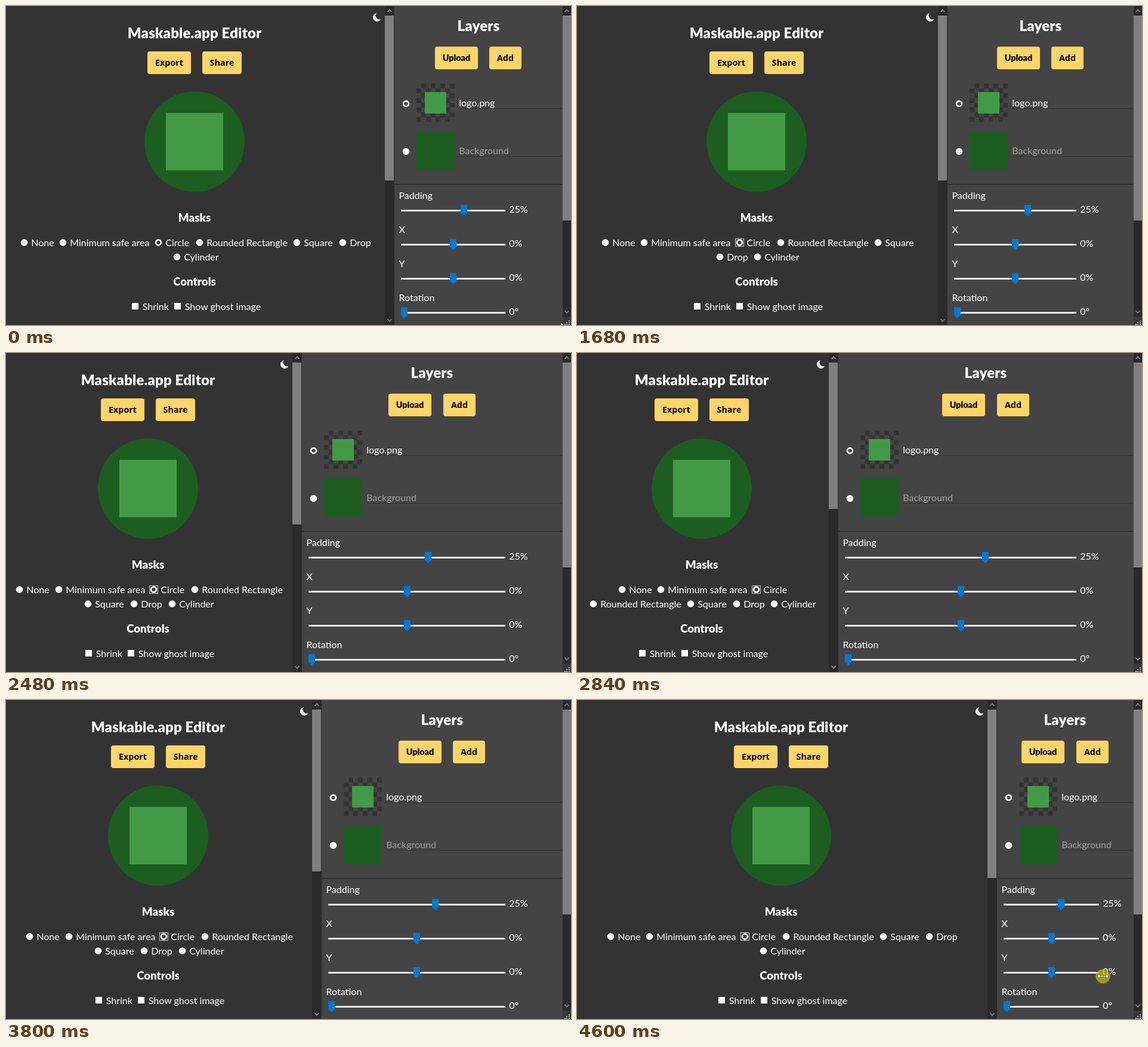
An HTML page that plays this animation: 947 px wide and 534 px high, repeating every 4840 ms.

```html
<!DOCTYPE html>
<html lang="en">
<head>
<meta charset="utf-8">
<title>Editor resize</title>
<style>
  html, body { margin: 0; width: 100%; height: 100%; overflow: hidden; background: #333; }
  svg { display: block; width: 947px; height: 534px; }
  text { font: 16px Lato, sans-serif; fill: #fff; white-space: pre; }
  .h1 { font-size: 24px; font-weight: 900; letter-spacing: .15px; text-anchor: middle; }
  .h3 { font-size: 18.72px; font-weight: 900; text-anchor: middle; }
  .btn { font: 700 14.4px "Open Sans", sans-serif; fill: #000; text-anchor: middle; }
  .lab { font: 900 14.4px Lato, sans-serif; fill: #000; text-anchor: middle; }
</style>
</head>
<body>
<svg id="stage" viewBox="0 0 947 534"></svg>
<script>
const LOOP = 4840, STEP = 40;
const stage = document.getElementById('stage');

// [time, x of the divider]
const DIVIDER = [
  [0, 651], [680, 651], [880, 645], [1040, 645], [1600, 627], [1640, 627],
  [1680, 621], [1920, 601], [2120, 572], [2200, 545], [2320, 521], [2560, 483],
  [2760, 451], [2840, 438], [3040, 424], [3280, 424], [3560, 458], [3720, 500],
  [3800, 529], [3840, 561], [3880, 568], [4080, 612], [4400, 678], [4600, 704], [LOOP, 704]
];
const CURSOR = [[0, 930, 529], [40, 930, 525], [160, 939, 525]];

// label, space it takes in a row
const MASKS = [
  ['None', 65.5], ['Minimum safe area', 159.5], ['Circle', 69],
  ['Rounded Rectangle', 163], ['Square', 77], ['Drop', 63.5], ['Cylinder', 86]
];
const SLIDERS = [['Padding', '25%', .61], ['X', '0%', .5], ['Y', '0%', .5], ['Rotation', '0°', 0]];

function add(parent, tag, attrs, text) {
  const el = document.createElementNS('http://www.w3.org/2000/svg', tag);
  for (const k in attrs) el.setAttribute(k, attrs[k]);
  if (text) el.textContent = text;
  return parent.appendChild(el);
}
const group = parent => add(parent, 'g', {});
const rect = (g, x, y, width, height, fill, rx = 0) => add(g, 'rect', { x, y, width, height, fill, rx });
const label = (g, x, y, text, cls = '') => add(g, 'text', { x, y, class: cls }, text);
const path = (g, d, fill) => add(g, 'path', { d, fill });
const move = (el, x, y = 0) => el.setAttribute('transform', `translate(${x} ${y})`);
const snap = x => Math.floor(x) + .5;

function radio(g, x, y, on, hole) {
  add(g, 'circle', { cx: x, cy: y, r: 5.8, fill: '#fff' });
  if (on) add(g, 'circle', { cx: x, cy: y, r: 3, fill: hole });
}
function button(g, x, y, w, text, cls) {
  rect(g, x, y, w, 38, '#ffd567', 4);
  label(g, x + w / 2, y + 24, text, cls);
}
function scrollbar(g, w, h, thumb) {
  rect(g, 0, 0, w, h, '#2a2a2a');
  for (const [y, s] of [[8, 1], [h - 8, -1]])
    add(g, 'path', {
      d: `M${w / 2 - 3.5} ${y + 2 * s}l3.5 ${-4 * s}l3.5 ${4 * s}`,
      fill: 'none', stroke: '#8c8c8c', 'stroke-width': 1.3
    });
  return rect(g, 0, 16, Math.min(w, 15), thumb - 16, '#808080');
}

// Preview side, centred on x = 0
const main = group(stage);
label(main, 0, 54, 'Maskable.app Editor', 'h1');
button(main, -79, 76, 73, 'Export', 'btn');
button(main, 13, 76, 66, 'Share', 'btn');
add(main, 'circle', { cx: 0, cy: 227, r: 84, fill: '#1b5e20' });
rect(main, -48, 179, 96, 96, '#439a46');
label(main, 0, 361, 'Masks', 'h3');
label(main, 0, 468, 'Controls', 'h3');
for (const [x, text] of [[-105, 'Shrink'], [-34, 'Show ghost image']]) {
  rect(main, x, 497, 11, 11, '#fff');
  label(main, x + 17.7, 509, text);
}
const masks = MASKS.map(([text], i) => {
  const g = group(stage);
  radio(g, 0, 0, i === 2, '#333');
  label(g, 11.7, 6, text);
  return g;
});
const ring = add(masks[2], 'rect', { x: -7, y: -6.5, width: 14, height: 13, fill: 'none', stroke: '#ccc' });
const moon = path(stage, 'M-1-7A7 7 0 1 0 6.3 3A6.4 6.4 0 0 1-1-7Z', '#fff');

// Layers side, starting at x = 0
const side = group(stage);
rect(side, 0, 0, 600, 534, '#444');
const head = group(stage);
label(head, 0, 42, 'Layers', 'h1');
button(head, -73, 68, 72, 'Upload', 'lab');
const addButton = group(stage);
button(addButton, 18, 68, 54, 'Add', 'btn');
radio(side, 19.5, 163.5, true, '#444');
radio(side, 19.5, 243.5, false);
for (let i = 0; i < 64; i++) {
  const col = i % 8, row = i >> 3;
  if ((col + row) % 2) rect(side, 37 + col * 8, 130 + row * 8, 8, 8, '#333');
}
rect(side, 51, 144, 36, 36, '#439a46');
rect(side, 37, 210, 64, 64, '#1b5e20');
rect(side, 109, 171, 500, 1, '#303030');
rect(side, 109, 251, 500, 1, '#303030');
label(side, 108.3, 168, 'logo.png');
label(side, 108.3, 248, 'Background').style.fill = '#a2a2a2';
rect(side, 0, 298, 600, 1, '#222');
const sliders = SLIDERS.map(([name, value, at], i) => {
  const y = 342 + i * 57;
  label(side, 7.5, y - 19, name);
  return {
    at, y,
    track: rect(side, 11, y - 1, 100, 3, '#e6e6e6'),
    thumb: path(side, 'M-5.5-9h11v13.5l-5.5 5.5l-5.5-5.5Z', '#0078d7'),
    value: label(side, 0, y + 4, value)
  };
});

const leftBar = group(stage);
const leftThumb = scrollbar(leftBar, 16, 534, 292);
const rightBar = group(stage);
move(rightBar, 933);
scrollbar(rightBar, 14, 520, 359);
rect(rightBar, 0, 520, 14, 14, '#383838');
for (const [x, y] of [[10, 526], [6, 529], [10, 529], [3, 532], [6, 532], [10, 532]])
  rect(rightBar, x, y, 2, 2, '#aaa');

// Pointer
const pointer = group(stage);
const arrow = path(pointer, 'M0 0v14l3.5-3.5l2.5 5.5l2-1l-2.5-5h5Z', '#fff');
arrow.setAttribute('stroke', '#000');
const resize = group(pointer);
const halo = add(resize, 'circle', { r: 12, fill: '#c8bc00' });
add(resize, 'path', {
  d: 'M-10 0l4.5-4v3h11v-3l4.5 4l-4.5 4v-3h-11v3Z',
  fill: '#fff', stroke: '#333', 'stroke-width': .6
});

function sample(keys, t, k = 1) {
  const i = keys.findIndex(key => key[0] > t);
  if (i < 0) return keys[keys.length - 1][k];
  const a = keys[i - 1], b = keys[i];
  return a[k] + (b[k] - a[k]) * (t - a[0]) / (b[0] - a[0]);
}
const show = (el, on) => el.setAttribute('visibility', on ? 'visible' : 'hidden');

// Wraps the mask options into centred rows
function flow(mid, width) {
  const rows = [];
  let row, used = Infinity;
  MASKS.forEach(([, w], i) => {
    if (used + w > width) { rows.push(row = { items: [], w: 0 }); used = 0; }
    row.items.push(i);
    row.w = used += w;
  });
  rows.forEach(({ items, w }, r) => {
    let x = mid + 13 - w / 2;
    for (const i of items) {
      move(masks[i], snap(x), 396 + r * 24);
      x += MASKS[i][1];
    }
  });
}

function draw(ms) {
  const t = Math.floor(ms % LOOP / STEP) * STEP;
  const p = Math.round(sample(DIVIDER, t));
  const mid = Math.ceil((p - 20) / 2);
  move(main, mid);
  move(moon, p - 29, 19);
  flow(mid, p - 28);
  show(ring, t >= 560);

  const sideMid = (p + 933) / 2;
  move(side, p);
  move(head, Math.floor(sideMid));
  move(addButton, Math.ceil(sideMid));
  const end = Math.max(837 - p, 171);
  for (const s of sliders) {
    s.track.setAttribute('width', end - 11);
    move(s.thumb, snap(16.5 + (end - 22) * s.at), s.y);
    s.value.setAttribute('x', end + 6.3);
  }
  move(leftBar, p - 16);
  leftThumb.setAttribute('height', p < 480 ? 245 : p < 550 ? 271 : p < 665 ? 276 : 282);

  if (t < 720) move(pointer, sample(CURSOR, t), sample(CURSOR, t, 2));
  else move(pointer, 1585.5 - p, t < 3000 ? 525 : 462.5 + (704 - p) * .2);
  show(arrow, t < 160);
  show(resize, t >= 160);
  halo.setAttribute('opacity', t < 560 ? 0 : .7);
}

const start = performance.now();
function tick() {
  draw(performance.now() - start);
  requestAnimationFrame(tick);
}
draw(0);
requestAnimationFrame(tick);
</script>
</body>
</html>
```
